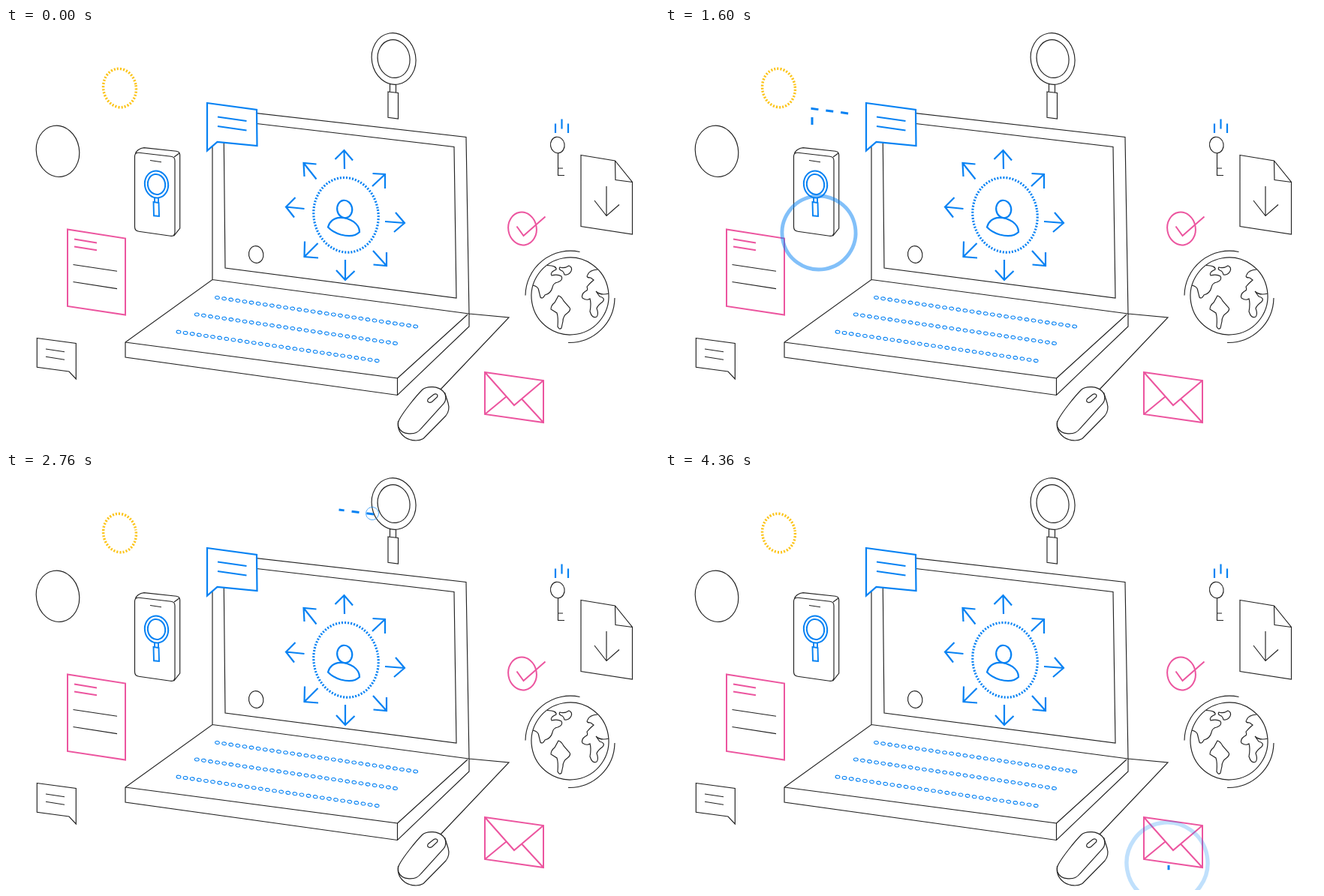
Animation, 870 px wide and 556 px high, one loop 4400 ms. Source, as an HTML page with a canvas:

```html
<!DOCTYPE html>
<html lang="en">
<head>
<meta charset="utf-8">
<title>Connected laptop</title>
<style>
html, body { margin: 0; width: 100%; height: 100%; overflow: hidden; background: #fff; }
canvas { display: block; width: 870px; height: 556px; }
</style>
</head>
<body>
<canvas id="stage" width="870" height="556"></canvas>
<script>
const ctx = document.getElementById('stage').getContext('2d');
const LOOP = 4400, STEP = 40;
const INK = '#222', BLUE = '#0782f3', PINK = '#ec559f', YELLOW = '#fcc419';
const TILT = -0.17;

function draw(d, color = INK, width = 1.15, fill) {
  const p = new Path2D(d);
  if (fill) { ctx.fillStyle = fill; ctx.fill(p); }
  ctx.strokeStyle = color;
  ctx.lineWidth = width;
  ctx.stroke(p);
}

function oval(x, y, rx, ry, color = INK, width = 1.15, tilt = TILT) {
  ctx.strokeStyle = color;
  ctx.lineWidth = width;
  ctx.beginPath();
  ctx.ellipse(x, y, rx, ry, tilt, 0, Math.PI * 2);
  ctx.stroke();
}

function laptop() {
  draw('M275 335.5V107L613 145.5L617 381V398L521.5 489.5L159 439V419L275 335.5L617 381L670 386L577 484');
  draw('M334 127.5L597 158.5L600 360L292 320L290 122');
  draw('M159 419L521.5 467V489.5M521.5 467L615 382');
  oval(333.2, 302, 9.7, 11.4);
  for (const [x, y] of [[281.5, 359.5], [254.3, 382], [230, 405.2]])
    for (let i = 0; i < 30; i++)
      oval(x + i * 9.11, y + i * 1.325, 2.9, 2, BLUE, 1.1, 0.14);
}

function screenIcons() {
  oval(451.2, 241.5, 10, 11.8, BLUE, 2.2);
  draw('M429 265.5C431 258 437 253 445 252.8C458 252.5 471 261 471 272C465 278 455 278 446 275.5C438 273 433 270 429 265.5Z', BLUE, 2.2);
  draw('M451 188L450.5 163M438.5 175L450.5 163L462 176.5' +
    'M488 211L505 195M488.5 194L505 195V214' +
    'M505 258L531 260M519 246L531 260L517 272' +
    'M489 297L507 317M507 299V317L489.5 315.5' +
    'M452 309V336M440 323L452 336L464.5 324' +
    'M415.5 287L397.5 305M398 284.5L397.5 305L416 306.5' +
    'M397.5 241L373 238.5M385.5 226L373 238.5L384 252.5' +
    'M413.5 201.5L396.5 180M413.5 181.5L396.5 180L397.5 198', BLUE, 2.2);
  draw('M268 100L334 109L334.5 157L281.5 152L268 163.5Z', BLUE, 2.2, '#fff');
  draw('M282 118.5L320.5 124M282 131L320.5 136.5', BLUE, 2.2);
}

function phone() {
  draw('M172.3 168C173 164 178 160 184 159.6L227 164.3Q231.7 165 231.7 169.5V267L223.5 277.3M224 172L231.5 166.5');
  draw('M171.5 171Q171.5 166 177 166.3L220 171.3Q225 172 225 177V272Q225 278 219 277.3L177 271.3Q171.5 270.5 171.5 265Z');
  draw('M192 176.5L207 178.8');
  oval(200.5, 208.5, 15.6, 18, BLUE, 2);
  oval(200.5, 208.5, 11.6, 13.6, BLUE, 2);
  draw('M198 226V232M203 226.5V233M196.5 232L203.5 233L204 251L197 250.3Z', BLUE, 1.9);
}

function papers() {
  draw('M82 268.5L159 280.5V382.5L82 371Z', PINK, 2);
  draw('M91 281.5L121 286.5M91 291.5L121 296.3', PINK, 2);
  draw('M89.5 315.5L148 324.2M89.5 338.5L148 347.6');
  draw('M41.3 413.5L93.3 420.5V468L84 458L41.3 452.3Z');
  draw('M53 428L78 431.7M53 438.3L78 442.2');
  draw('M766 169.5L811.5 177L834.5 205.5V275L766 264.5ZM811.5 177L812 202.5L834.5 205.5');
  draw('M800 211V250.5M784 230L800 250.5L817 235.5');
  draw('M638 459L716 470V526L638 515ZL677 503L716 470M638 515L666.5 491.5M687.5 495L716 526', PINK, 2);
}

function tools() {
  oval(69, 164.3, 28.6, 34.3);
  oval(516.6, 41, 29.3, 34.5);
  oval(516.6, 41, 21.4, 25.5);
  draw('M511.5 74.5V85M519.5 75V86M509 85L522.5 86.5V121L509 119.3Z');
  oval(734.8, 156, 9.3, 10.8);
  draw('M735.5 167V196.5H744M735.5 187H742');
  draw('M732 127.5V140M740.5 121.5V134.5M749 127.5V140', BLUE, 2.2);
  oval(688, 267.5, 18.8, 22, PINK, 2);
  draw('M680.5 264.5L689.5 277L718.5 251.5', PINK, 2);
  draw('M522.5 524C521 534 525 541 532 546C540 551 550 551 556 547.5L586 517C590 512 590.5 505 589 500L584.5 486', INK, 1.15, '#fff');
  draw('M524 522C530 511 546 491 555 482C562 476.5 576 478 582 484C587 489 587 496 583 501L553 534C546 544 527 543 523 532Q521.5 527 524 522Z', INK, 1.15, '#fff');
  draw('M562.5 494.5L570 488.5C573 487 576 488.5 574.5 492L567.5 498.5C564 500.5 560 498.5 562.5 494.5Z');
}

function globe() {
  oval(751.5, 357.5, 51.5, 51.5);
  draw('M692 356.5A60 60 0 0 1 764.5 298.5M811 360A60.5 60.5 0 0 1 749 419.5');
  draw('M702 343Q710 345 710 351L712 359Q715 362 718 356Q726 354 728 346Q729 340 735 339Q743 336 740 331Q735 328 727 330Q724 326 733 322Q734 317 721 316.5');
  draw('M738 319Q744 321 750 317Q755 319 753 324Q750 330 744 329Q743 324 739 323Q736 321 738 319Z');
  draw('M736 357Q740 358 743 364L751 373Q753 376 748 380Q742 384 742 391L740 400Q737 403 735 398Q736 386 734 380L726 375Q726 370 731 366Z');
  draw('M788 322Q777 323 775 329Q772 333 779 333L783 336Q777 341 774 345Q776 350 772 351Q766 355 768 360Q774 364 778 361Q780 367 778 378Q781 388 787 385Q790 381 787 374Q788 370 795 365Q799 360 791 358L786 351Q792 357 803 354');
}

// A dotted ring whose dots travel a whole number of gaps per loop.
function dottedRing(x, y, rx, ry, color, width, dots, turns, t) {
  const h = ((rx - ry) / (rx + ry)) ** 2;
  const around = Math.PI * (rx + ry) * (1 + 3 * h / (10 + Math.sqrt(4 - 3 * h)));
  const gap = around / dots;
  ctx.setLineDash([gap / 2, gap / 2]);
  ctx.lineDashOffset = -gap * turns * t / LOOP;
  oval(x, y, rx, ry, color, width);
  ctx.setLineDash([]);
}

// pts: start, corner, end; hub: ripple centre; phase: where the dashes begin
const links = [
  { pts: [[82, 320], [68, 318], [68, 207]], start: 0, time: 840, phase: 6, hub: [68, 197], ring: 520 },
  { pts: [[160, 304.5], [205, 311], [205, 278]], start: 680, time: 920, phase: 0, hub: [205, 273], ring: 1320 },
  { pts: [[196, 160], [196, 107.5], [267, 117]], start: 1400, time: 920, phase: 11, hub: [268, 114], ring: 2040 },
  { pts: [[409.5, 124], [409.5, 44.5], [490, 55]], start: 2080, time: 960, phase: 11, hub: [488, 54], ring: 2720 },
  { pts: [[613, 165], [706, 177.5], [706, 247]], start: 2840, time: 920, phase: 6, hub: [704, 248], ring: 3480 },
  { pts: [[537, 548], [671, 566], [671, 523]], start: 3400, time: 1000, phase: 12, hub: [669, 520], ring: 4040 }
];
const HEAD_TIME = 240;
const clamp = v => Math.max(0, Math.min(1, v));

function dashedLink({ pts: [a, b, c], start, time, phase }, t) {
  const head = clamp((t - start) / HEAD_TIME), tail = clamp((t - start) / time);
  if (head <= tail) return;
  const first = Math.hypot(b[0] - a[0], b[1] - a[1]);
  const total = first + Math.hypot(c[0] - b[0], c[1] - b[1]);
  const from = tail * total, to = head * total;
  const at = d => {
    const [p, q, k] = d < first ? [a, b, d / first] : [b, c, (d - first) / (total - first)];
    return [p[0] + (q[0] - p[0]) * k, p[1] + (q[1] - p[1]) * k];
  };
  ctx.strokeStyle = BLUE;
  ctx.lineWidth = 3;
  ctx.setLineDash([10, 10]);
  ctx.lineDashOffset = from - phase;
  ctx.beginPath();
  ctx.moveTo(...at(from));
  if (from < first && to > first) ctx.lineTo(...b);
  ctx.lineTo(...at(to));
  ctx.stroke();
  ctx.setLineDash([]);
}

function ripple({ hub, ring }, t) {
  const n = (t - ring) / STEP;
  if (n <= 0 || n >= 9) return;
  const r = 8.75 * n - 0.25 * n * n;
  ctx.globalAlpha = Math.min(0.8, (9 - n) / 4);
  oval(...hub, r, r, BLUE, r * 0.1);
  ctx.globalAlpha = 1;
}

function render(t) {
  ctx.fillStyle = '#fff';
  ctx.fillRect(0, 0, 870, 556);
  laptop();
  screenIcons();
  phone();
  papers();
  tools();
  globe();
  dottedRing(151.5, 80, 21.8, 25.8, YELLOW, 3.5, 36, 12, t);
  dottedRing(453, 249.3, 43, 50, BLUE, 3.2, 72, 12, t);
  for (const link of links) {
    dashedLink(link, t);
    ripple(link, t);
  }
}

const began = performance.now();
function tick() {
  const t = (performance.now() - began) % LOOP;
  render(Math.floor(t / STEP) * STEP);
  requestAnimationFrame(tick);
}
tick();
</script>
</body>
</html>
```
